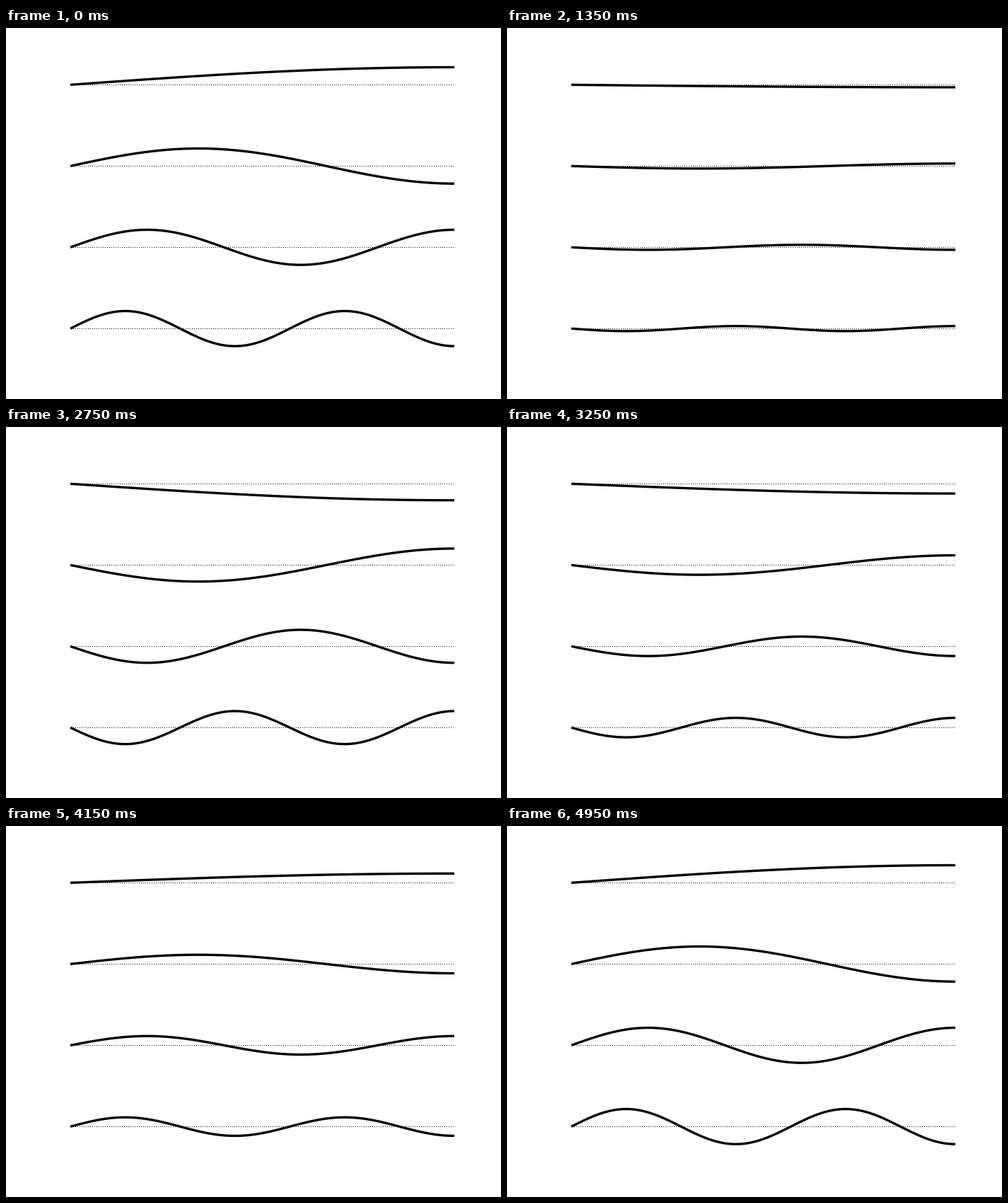
Animation of 700 by 525 pixels, one loop 5000 ms. Source, as a matplotlib script:

```python
import numpy as np
import matplotlib.pyplot as plt
from matplotlib.animation import FuncAnimation

WIDTH, HEIGHT, DPI = 700, 525, 100
PX = 72 / DPI                # one pixel in points
FRAMES, INTERVAL = 100, 50
LEFT, RIGHT = 91, 634
TOP, SPACING = 80.35, 115    # first string's rest height, gap between strings
AMPLITUDE = 24.84

plt.rcParams["path.simplify"] = False

fig = plt.figure(figsize=(WIDTH / DPI, HEIGHT / DPI), dpi=DPI, facecolor="white")
ax = fig.add_axes([0, 0, 1, 1])
ax.set_xlim(0, WIDTH)
ax.set_ylim(HEIGHT, 0)
ax.axis("off")

u = np.linspace(0, 1, 400)
x = LEFT + (RIGHT - LEFT) * u
phases = np.linspace(0, 2 * np.pi, FRAMES)   # both ends included

# Standing waves fixed at the left end and free at the right end
shapes = [np.sin((2 * n + 1) * np.pi / 2 * u) for n in range(4)]
strings = []
for n in range(4):
    axis_y = np.floor(TOP) + n * SPACING + 0.5
    ax.plot([LEFT + 1, RIGHT - 1], [axis_y, axis_y], color="black", lw=PX,
            ls=(0, (1, 2)), dash_capstyle="butt", snap=False)
    line, = ax.plot([], [], color="black", lw=10 / 3 * PX, snap=False,
                    solid_capstyle="butt", solid_joinstyle="round")
    strings.append(line)


def draw(frame):
    swing = AMPLITUDE * np.cos(phases[frame])
    for n, (line, shape) in enumerate(zip(strings, shapes)):
        line.set_data(x, TOP + n * SPACING - swing * shape)
    return strings


anim = FuncAnimation(fig, draw, frames=FRAMES, interval=INTERVAL,
                     repeat=True, repeat_delay=0, blit=False)
plt.show()
```
